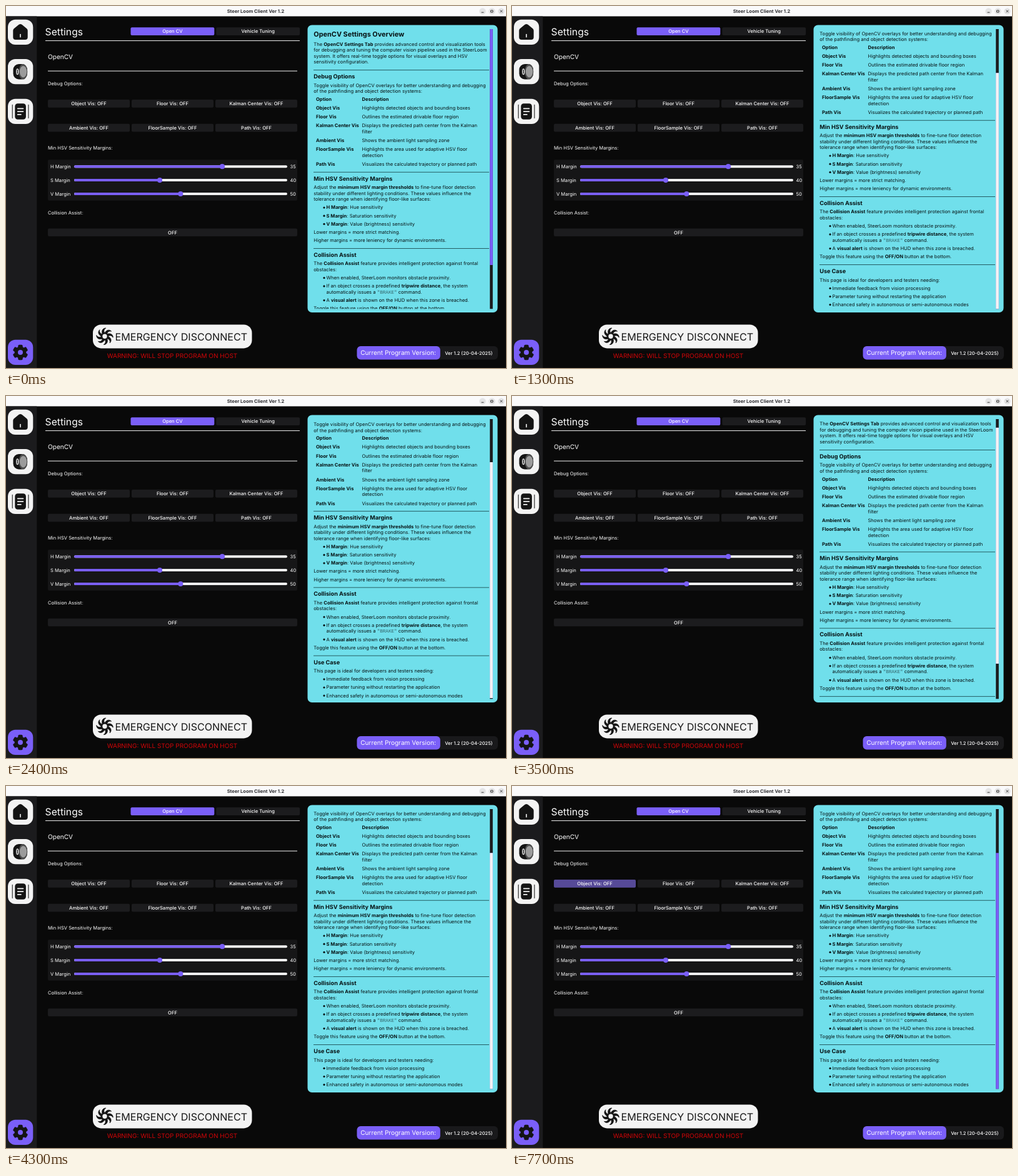
Write an HTML page that moves like this. It is 800x580 px and loops after 8000 ms.

```html
<!DOCTYPE html>
<html lang="en">
<head>
<meta charset="utf-8">
<title>Settings</title>
<style>
  html, body { margin: 0; width: 100%; height: 100%; overflow: hidden; background: #090909; }
  svg { display: block; width: 800px; height: 580px; }
  text { font-family: Inter, sans-serif; white-space: pre; text-rendering: geometricPrecision; }
  .b { font-weight: 700; }
  .m { font-weight: 500; }
  .code { font-family: "Liberation Mono", monospace; fill: #35676d; }
</style>
</head>
<body>
<svg id="stage" viewBox="0 0 800 580"></svg>
<script>
const PURPLE = '#7a5ff8', LIGHT = '#f3f3f3', GREY = '#1c1c1e', BODY = 7.6;

const rect = (x, y, w, h, fill, r = 0, more = '') =>
  `<rect x="${x}" y="${y}" width="${w}" height="${h}" rx="${r}" fill="${fill}" ${more}/>`;
const circle = (x, y, r, fill, more = '') => `<circle cx="${x}" cy="${y}" r="${r}" fill="${fill}" ${more}/>`;
const path = (d, more) => `<path d="${d}" ${more}/>`;
const stroke = (color, w) => `fill="none" stroke="${color}" stroke-width="${w}" stroke-linecap="round" stroke-linejoin="round"`;

// cy is the middle of the capitals; *bold* and `code` mark inline styles
function text(x, cy, str, size = BODY, fill = '#fff', more = '') {
  const inner = str
    .replace(/\*(.+?)\*/g, '<tspan class="b">$1</tspan>')
    .replace(/`(.+?)`/g, '<tspan class="code">$1</tspan>');
  return `<text x="${x}" y="${cy + size * 0.364}" font-size="${size}" fill="${fill}" ${more}>${inner}</text>`;
}
const centred = (x, cy, str, size, fill, cls = 'm') =>
  text(x, cy, str, size, fill, `text-anchor="middle" class="${cls}"`);

function button(x, y, w, label, id, fill = GREY) {
  const glow = id ? rect(x, y, w, 12.7, '#564a98', 2, `id="${id}" opacity="0"`) : '';
  return rect(x, y, w, 12.7, fill, 2) + glow + centred(x + w / 2, y + 6.4, label);
}

function titleBar() {
  return rect(0, 0, 800, 16.5, '#fafafb') +
    centred(399.5, 8.2, 'Steer Loom Client Ver 1.2', 7.5, '#2e2e32', 'b') +
    [762.5, 777.5, 792.5].map(x => circle(x, 8.4, 5.2, '#e4e4e5')).join('') +
    path('M761 10.2h3', stroke('#333', 1)) +
    path('M776 7h3v3h-3z', stroke('#333', 1)) +
    path('M791 6.9l3 3m0-3l-3 3', stroke('#333', 1));
}

function sidebar() {
  const tile = (y, fill = LIGHT) => rect(3, y, 40.3, 40.3, fill, 12);
  const house = path('M11.3 39.5Q11.3 37.4 13 36L20.6 29.8Q23 28 25.4 29.8L33 36Q34.7 37.4 34.7 39.5V50Q34.7 54 30.7 54H15.3Q11.3 54 11.3 50Z', 'fill="#141414"') +
    path('M23 45.5v4.3', stroke(LIGHT, 1.6));
  const wheel = rect(11.5, 93, 22.5, 24.5, '#141414', 9) +
    '<ellipse cx="27.3" cy="105.2" rx="7" ry="12.3" fill="#4b4b4b"/>' +
    '<ellipse cx="27.6" cy="105.2" rx="5.6" ry="9.3" fill="#9b9b9b"/>' +
    '<ellipse cx="18.3" cy="105.2" rx="2.2" ry="5" fill="#e4e4e4"/>' +
    path('M18.3 102.5v5.4', stroke('#141414', 1.3));
  const notes = rect(14.3, 156.3, 17.6, 25.5, '#141414', 4.5) +
    path('M18.7 164.3h8.8m-8.8 4.8h8.8m-8.8 4.8h5.2', stroke(LIGHT, 1.7)) +
    path('M10.3 158.5v21m25.6-21v21', stroke('#555', 1.5));
  let teeth = '';
  for (let a = 0; a < 360; a += 60)
    teeth += rect(19.3, 542.8, 7.4, 8, '#141414', 2, `transform="rotate(${a} 23 555)"`);
  const gear = teeth + circle(23, 555, 9.4, '#141414') + circle(23, 555, 4, PURPLE);
  return rect(0, 16.5, 49.3, 563.5, '#1b1b1d') +
    tile(21.7) + house + tile(85) + wheel + tile(148.8) + notes + tile(534.8, PURPLE) + gear;
}

function slider(y, name, x, value) {
  return text(71, y, name) + rect(109, y - 2, 341, 4, LIGHT, 2) +
    rect(109, y - 2, x - 109, 4, PURPLE, 2) + circle(x, y, 4.1, PURPLE) + text(454.6, y, value);
}

function controls() {
  const cols = [67, 201, 335];
  const row = (y, labels) => labels.map(([s, id], i) => button(cols[i], y, 131, s + ' Vis: OFF', id)).join('');
  return text(62.6, 41, 'Settings', 15.7) +
    button(199.5, 34.2, 133.8, 'Open CV', '', PURPLE) +
    button(336.3, 34.2, 133.8, 'Vehicle Tuning') +
    rect(63, 55, 407, 1.1, '#ddd') +
    text(67, 81.3, 'OpenCV', 10.1) + rect(67, 103.6, 399, 1.1, '#ddd') +
    text(67, 124.5, 'Debug Options:') +
    row(150, [['Object', 'object'], ['Floor'], ['Kalman Center']]) +
    row(188.8, [['Ambient', 'ambient'], ['FloorSample'], ['Path']]) +
    text(67, 227, 'Min HSV Sensitivity Margins:') +
    rect(67, 246.3, 399, 65.5, '#161617', 2) +
    slider(257.2, 'H Margin', 346, '35') +
    slider(279.1, 'S Margin', 246, '40') +
    slider(301, 'V Margin', 279.3, '50') +
    text(67, 331, 'Collision Assist:') +
    button(67, 356.4, 399, 'OFF', 'assist');
}

function footer() {
  let swirl = '';
  for (let a = 0; a < 360; a += 45)
    swirl += path('M158 523.8C161 518.5 165.5 518 168.6 521.2C164.8 520.4 162.6 522 161.5 525.5Z',
      `fill="#141414" stroke="#141414" stroke-width=".8" transform="rotate(${a} 158 529.3)"`);
  return rect(139, 510.4, 254.5, 38, LIGHT, 13) + swirl +
    circle(158, 529.3, 4.6, LIGHT, 'stroke="#141414" stroke-width="1.8"') +
    text(174.5, 530, 'EMERGENCY DISCONNECT', 16.1, '#161616') +
    centred(266, 560.3, 'WARNING: WILL STOP PROGRAM ON HOST', 10, '#d00508', '') +
    rect(561.5, 545, 225.5, 21.5, '#19191b', 6) + rect(561.5, 545, 133.3, 21.5, PURPLE, 6) +
    centred(627.5, 555.8, 'Current Program Version:', 10.05, '#fff', '') +
    centred(740.3, 555.8, 'Ver 1.2 (20-04-2025)', 7.5);
}

function help() {
  const ink = '#071315';
  const line = (y, s, x = 492.3) => text(x, y, s, BODY, ink);
  const head = (y, s, size = 9.1) => text(492.3, y, `*${s}*`, size, ink);
  const rule = y => rect(492, y, 281, 0.8, '#123c40');
  const item = (y, s) => circle(509, y + 0.3, 1.6, ink) + line(y, s, 512.6);
  const pair = (y, name, s, rest) =>
    line(y, `*${name}*`, 496) + line(y, s, 569.5) + (rest ? line(y + 9.6, rest, 569.5) : '');
  const para = (y, ...rows) => rows.map((s, i) => line(y + i * 9.5, s)).join('');
  return head(45.3, 'OpenCV Settings Overview', 10.9) +
    para(60.8, 'The *OpenCV Settings Tab* provides advanced control and visualization tools',
      'for debugging and tuning the computer vision pipeline used in the SteerLoom',
      'system. It offers real-time toggle options for visual overlays and HSV',
      'sensitivity configuration.') +
    rule(102.3) + head(113, 'Debug Options') +
    para(127, 'Toggle visibility of OpenCV overlays for better understanding and debugging',
      'of the pathfinding and object detection systems:') +
    pair(149.2, 'Option', '*Description*') +
    pair(163.2, 'Object Vis', 'Highlights detected objects and bounding boxes') +
    pair(177.5, 'Floor Vis', 'Outlines the estimated drivable floor region') +
    pair(191.6, 'Kalman Center Vis', 'Displays the predicted path center from the Kalman', 'filter') +
    pair(215.4, 'Ambient Vis', 'Shows the ambient light sampling zone') +
    pair(229.5, 'FloorSample Vis', 'Highlights the area used for adaptive HSV floor', 'detection') +
    pair(253.3, 'Path Vis', 'Visualizes the calculated trajectory or planned path') +
    rule(265.8) + head(276.4, 'Min HSV Sensitivity Margins') +
    para(290.5, 'Adjust the *minimum HSV margin thresholds* to fine-tune floor detection',
      'stability under different lighting conditions. These values influence the',
      'tolerance range when identifying floor-like surfaces:') +
    item(322.7, '*H Margin*: Hue sensitivity') +
    item(335.9, '*S Margin*: Saturation sensitivity') +
    item(349, '*V Margin*: Value (brightness) sensitivity') +
    line(362.2, 'Lower margins = more strict matching.') +
    line(375.4, 'Higher margins = more leniency for dynamic environments.') +
    rule(388) + head(398.5, 'Collision Assist') +
    para(412.4, 'The *Collision Assist* feature provides intelligent protection against frontal', 'obstacles:') +
    item(435.3, 'When enabled, SteerLoom monitors obstacle proximity.') +
    item(448.6, 'If an object crosses a predefined *tripwire distance*, the system') +
    line(458, 'automatically issues a `"BRAKE"` command.', 512.6) +
    item(471.3, 'A *visual alert* is shown on the HUD when this zone is breached.') +
    line(484.5, 'Toggle this feature using the *OFF/ON* button at the bottom.') +
    rule(497.2) + head(508, 'Use Case') +
    line(522, 'This page is ideal for developers and testers needing:') +
    item(535, 'Immediate feedback from vision processing') +
    item(548.2, 'Parameter tuning without restarting the application') +
    item(561.3, 'Enhanced safety in autonomous or semi-autonomous modes');
}

const stage = document.getElementById('stage');
stage.innerHTML =
  rect(0, 0, 800, 580, '#090909') + titleBar() + sidebar() + controls() + footer() +
  rect(482.5, 30.5, 304, 460.5, '#70dfeb', 7) +
  `<clipPath id="view">${rect(485, 37, 290, 448.5, '#000')}</clipPath>` +
  `<g clip-path="url(#view)"><g id="help">${help()}</g></g>` +
  rect(774.2, 37, 4.6, 448.3, '#1b1b1d') +
  `<g id="bar">${rect(774.2, 37, 4.6, 378, PURPLE)}${rect(774.2, 37, 4.6, 378, LIGHT, 0, 'id="held"')}</g>`;

// [ms, value] keys, linear between them
const tracks = {
  scroll: [[700, 0], [1100, 82], [1200, 82], [1300, 83], [1400, 83], [1700, 0], [1900, 0], [2200, 83],
    [2300, 83], [2400, 81.5], [2600, 0], [3400, 0], [3500, 16.3], [4300, 83]],
  held: [[400, 0], [500, 1], [4500, 1], [4700, 0]],
  assist: [[5100, 0], [5200, 0.5], [5300, 0.6], [5400, 0]],
  ambient: [[5500, 0], [5600, 0.6], [5700, 0.2], [5800, 0]],
  object: [[5600, 0], [5700, 0.6], [5800, 0.4], [5900, 0], [7300, 0], [7700, 1]]
};

function valueAt(keys, t) {
  const i = keys.findIndex(k => k[0] > t);
  if (i < 0) return keys[keys.length - 1][1];
  if (i === 0) return keys[0][1];
  const [t0, a] = keys[i - 1], [t1, b] = keys[i];
  return a + (b - a) * (t - t0) / (t1 - t0);
}

const el = id => document.getElementById(id);
const start = performance.now();
function draw() {
  // the screen updates ten times a second
  const t = Math.floor((performance.now() - start) % 8000 / 100) * 100;
  const scroll = valueAt(tracks.scroll, t);
  el('help').setAttribute('transform', `translate(0 ${-scroll})`);
  el('bar').setAttribute('transform', `translate(0 ${scroll * 70.3 / 83})`);
  for (const id of ['held', 'assist', 'ambient', 'object'])
    el(id).setAttribute('opacity', valueAt(tracks[id], t));
  requestAnimationFrame(draw);
}
draw();
</script>
</body>
</html>
```
